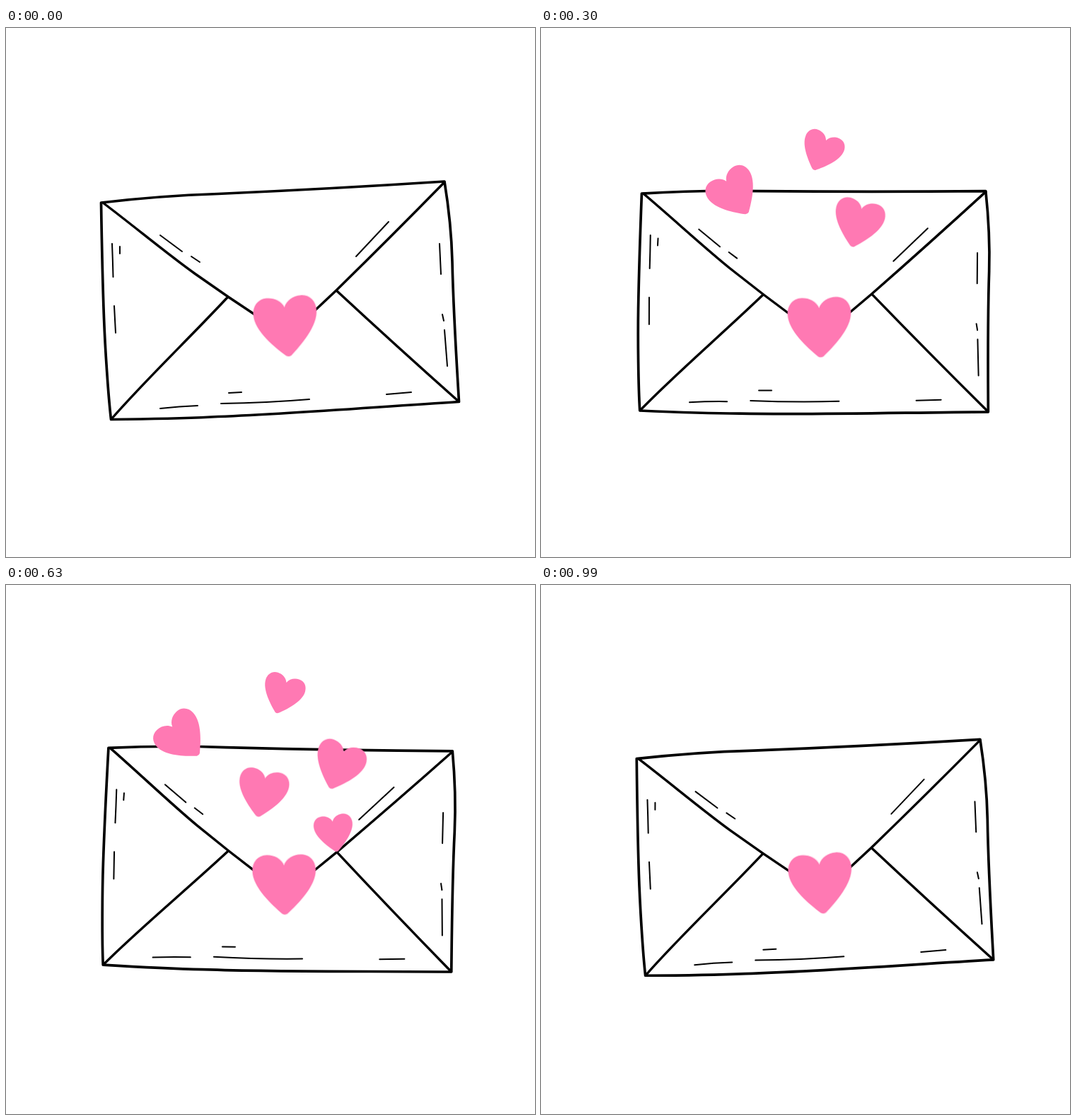
Write an HTML page with a canvas that moves like this. It is 748 px wide and 748 px high and loops after 1020 ms.

```html
<!DOCTYPE html>
<html lang="en">
<head>
<meta charset="utf-8">
<title>Love letter</title>
<style>
  html, body { margin: 0; width: 100%; height: 100%; overflow: hidden; background: #fff; }
  canvas { display: block; width: 748px; height: 748px; }
</style>
</head>
<body>
<canvas id="stage" width="748" height="748"></canvas>
<script>
const ctx = document.getElementById('stage').getContext('2d');
const LOOP = 1020, STEP = 30, FADE = 60;
const SWING = 5.3, PIVOT = { x: 374, y: 386 };
const PINK = '#ff79b3';
const rad = deg => deg * Math.PI / 180;
const clamp01 = v => Math.min(1, Math.max(0, v));

// Heart with its tip at the origin, 89 wide and 84 high.
const heart = new Path2D(
  'M0-69C-4-79-14-84-24-84C-37-84-44.5-74-44.5-62C-44.5-39-18-14-3.5-1Q0 1 3.5-1' +
  'C18-14 44.5-39 44.5-62C44.5-74 37-84 24-84C14-84 4-79 0-69Z');

const outline = new Path2D(
  'M134.5 247C185 241 240 236.5 300 234.5C400 230 520 223.5 620 217' +
  'C627 260 630 290 631 330C632.5 400 637 470 640.5 528.5' +
  'C520 536 400 546 290 550C250 552 200 553 148.5 553.5' +
  'C144.5 520 140 450 138.5 410C137 370 135.5 310 134.5 247Z');

const folds = new Path2D(
  'M137 247C182 281 230 321 268 348L314 380L356 408' +
  'M620 218C572 267 519 320 467 371L434 402' +
  'M149 553C195 500 255 443 314 380M467 371Q550 448 640 528');

const ticks = new Path2D(
  'M150 305Q151 330 151.5 352M161 309V319M153 393L155 431' +
  'M218 293L249 316M262 323L274 331M541 274L495 323' +
  'M613 305L615 348M617 405L619 414M620 427L624 478' +
  'M218 538Q245 535 271 534M315 516L333 515M304 531Q370 530 429 525M538 518L573 515');

// Tip position and angle at time t0, velocity per second, middle of entry and exit.
const hearts = [
  { t0: 180, x: 299, y: 270.5, vx: -59, vy: -66.7, rot: -29.5, spin: -30, size: .79, enter: 60, leave: 810, hard: true },
  { t0: 180, x: 387, y: 208, vx: -10, vy: -60, rot: 24, spin: -13.3, size: .655, enter: 150, leave: 870, hard: true },
  { t0: 300, x: 440, y: 309, vx: 58, vy: -65, rot: 14, spin: 16.7, size: .79, enter: 270, leave: 900 },
  { t0: 510, x: 362, y: 332.5, vx: -47.5, vy: -43, rot: 12.5, spin: -15.3, size: .79, enter: 390, leave: 930 },
  { t0: 510, x: 449, y: 382.5, vx: 156, vy: -48, rot: -12, spin: 33.3, size: .615, enter: 510, leave: 960 }
];

function line(path, width) {
  ctx.lineWidth = width;
  ctx.stroke(path);
}

function drawHeart(x, y, rot, size, alpha, soft) {
  ctx.save();
  ctx.translate(x, y);
  ctx.rotate(rad(rot));
  ctx.scale(size, size);
  ctx.fillStyle = ctx.strokeStyle = PINK;
  ctx.globalAlpha = alpha;
  ctx.fill(heart);
  if (soft) {
    ctx.globalAlpha = alpha * .35;
    line(heart, 2);
  }
  ctx.restore();
}

function drawEnvelope(t) {
  const swing = 1 - Math.abs(2 * t / LOOP - 1);
  ctx.save();
  ctx.translate(PIVOT.x, PIVOT.y);
  ctx.rotate(rad(SWING * swing));
  ctx.translate(-PIVOT.x, -PIVOT.y);
  ctx.strokeStyle = '#000';
  ctx.lineCap = ctx.lineJoin = 'round';
  line(outline, 3.7);
  line(folds, 3.4);
  line(ticks, 2);
  drawHeart(400, 464, -5.2, 1, 1, true);
  ctx.restore();
}

function drawFloating(h, t) {
  const show = clamp01((t - h.enter) / FADE + .5) * clamp01((h.leave - t) / FADE + .5);
  if (show < (h.hard ? .45 : .01)) return;
  const s = (t - h.t0) / 1000;
  const rot = h.rot + h.spin * s;
  let x = h.x + h.vx * s, y = h.y + h.vy * s, size = h.size;
  if (h.hard) {
    // Shrinks about its middle instead of turning translucent.
    const k = .64 + .36 * show, lift = 42 * size * (1 - k);
    x += lift * Math.sin(rad(rot));
    y -= lift * Math.cos(rad(rot));
    size *= k;
  }
  drawHeart(x, y, rot, size, h.hard ? 1 : show, !h.hard);
}

function render(now) {
  const t = Math.floor((now % LOOP) / STEP + 1e-6) * STEP % LOOP;
  ctx.fillStyle = '#fff';
  ctx.fillRect(0, 0, 748, 748);
  drawEnvelope(t);
  hearts.forEach(h => drawFloating(h, t));
}

let start;
function tick(now) {
  if (start === undefined) start = now;
  render(now - start);
  requestAnimationFrame(tick);
}
render(0);
requestAnimationFrame(tick);
</script>
</body>
</html>
```
